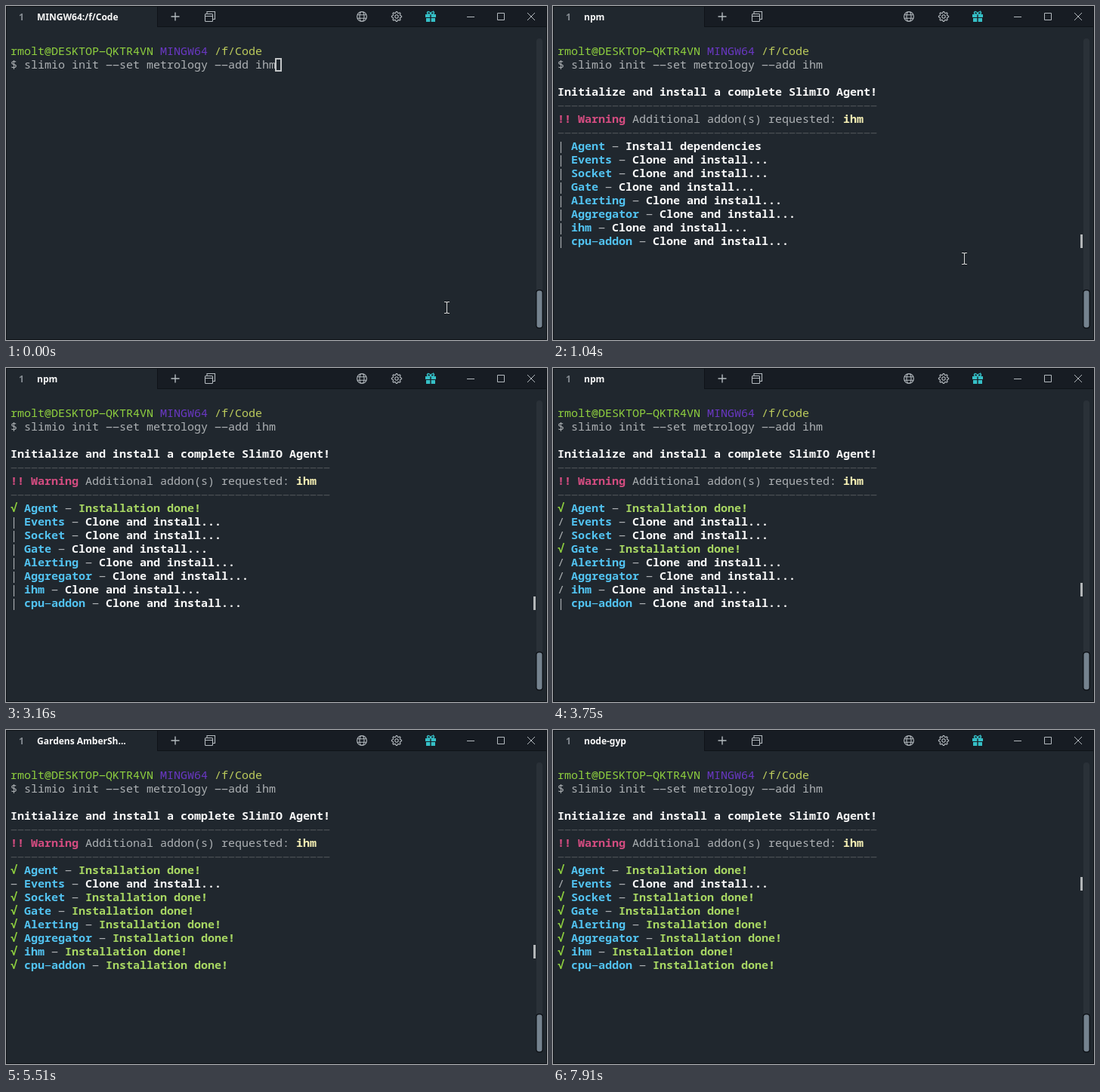
These frames come from a looping animation (716x443 px, 8000 ms). An HTML page with a canvas:

```html
<!DOCTYPE html>
<html lang="en">
<head>
<meta charset="utf-8">
<title>Terminal</title>
<style>
html, body { margin: 0; width: 716px; height: 443px; overflow: hidden; background: #20272e; }
canvas { display: block; }
</style>
</head>
<body>
<canvas id="stage" width="716" height="443"></canvas>
<script>
const ctx = document.getElementById('stage').getContext('2d');
const LOOP = 8000, CELL = 9, LINE = 18, LEFT = 6, TOP = 51;
const TICK = 130, TICK_START = 100, LAG = 25;
const MONO = '"Noto Sans Mono", "DejaVu Sans Mono", monospace';
const SANS = '"Noto Sans", "Open Sans", sans-serif';
const C = {
  bg: '#20272e', bar: '#171c23', edge: '#0f1318', text: '#adb1b4', white: '#fafafa',
  dim: '#4b5054', green: '#8fd03f', lime: '#a8d763', path: '#bccb5c', purple: '#6a38c4',
  pink: '#d34c80', cream: '#f5efb4', blue: '#52c3f1', icon: '#b4babf', teal: '#35bfc6'
};
const NORMAL = 500, BOLD = 600;

// name, time the row appears, time it is done
const TASKS = [
  ['Agent', 580, 2100],
  ['Events', 880, Infinity],
  ['Socket', 880, 3850],
  ['Gate', 880, 3720],
  ['Alerting', 880, 4020],
  ['Aggregator', 880, 4240],
  ['ihm', 880, 5470],
  ['cpu-addon', 880, 4800]
].map(([name, from, done], i) => ({ name, from, done, row: 7 + i }));

const TITLES = [
  [0, 'MINGW64:/f/Code'], [880, 'npm'], [4900, 'node-gyp'],
  [5400, 'Gardens AmberSh...'], [6450, 'node-gyp']
];

function rect(x, y, w, h, color) {
  ctx.fillStyle = color;
  ctx.fillRect(x, y, w, h);
}

function pill(x, y, w, h, r, color) {
  ctx.fillStyle = color;
  ctx.beginPath();
  ctx.roundRect(x, y, w, h, r);
  ctx.fill();
}

function path(color, width, draw) {
  ctx.strokeStyle = color;
  ctx.lineWidth = width;
  ctx.beginPath();
  draw();
  ctx.stroke();
}

function line(...p) {
  ctx.moveTo(p[0], p[1]);
  for (let i = 2; i < p.length; i += 2) ctx.lineTo(p[i], p[i + 1]);
}

// Runs are [text, color, weight]; hyphens are drawn as wide strokes.
function print(row, ...runs) {
  const top = TOP + row * LINE;
  let x = LEFT;
  for (const [text, color, weight = NORMAL] of runs) {
    ctx.font = `${weight} 15px ${MONO}`;
    ctx.fillStyle = color;
    ctx.fillText(text.replace(/-/g, ' '), x, top + 14);
    [...text].forEach((c, i) => {
      if (c === '-') rect(x + i * CELL + 0.7, top + 9, 7.6, 1.2, color);
    });
    x += text.length * CELL;
  }
}

function drawGlobe(x, y) {
  path(C.icon, 1.1, () => {
    ctx.arc(x, y, 6.4, 0, 7);
    ctx.moveTo(x + 3, y);
    ctx.ellipse(x, y, 3, 6.4, 0, 0, 7);
    line(x - 6, y - 2.2, x + 6, y - 2.2);
    line(x - 6, y + 2.2, x + 6, y + 2.2);
  });
}

function drawGear(x, y) {
  path(C.icon, 1.1, () => {
    for (let i = 0; i <= 32; i++) {
      const a = (i - 0.5) * Math.PI / 16;
      const r = i % 4 < 2 ? 6.6 : 5;
      ctx.lineTo(x + r * Math.cos(a), y + r * Math.sin(a));
    }
    ctx.moveTo(x + 2.2, y);
    ctx.arc(x, y, 2.2, 0, 7);
  });
}

function drawGift(x, y) {
  rect(x - 7, y - 3, 6.3, 4, C.teal);
  rect(x + 0.7, y - 3, 6.3, 4, C.teal);
  rect(x - 6, y + 2, 5.3, 5, C.teal);
  rect(x + 0.7, y + 2, 5.3, 5, C.teal);
  path(C.teal, 1.4, () => {
    ctx.ellipse(x - 2.4, y - 4.6, 2.2, 1.6, 0.5, 0, 7);
    ctx.moveTo(x + 4.4, y - 4.6);
    ctx.ellipse(x + 2.4, y - 4.6, 2.2, 1.6, -0.5, 0, 7);
  });
}

function drawWindow(t) {
  rect(0, 0, 716, 443, C.bg);
  rect(201, 0, 515, 27, C.bar);
  rect(200, 0, 1, 28, C.edge);
  rect(201, 27, 515, 1, C.edge);
  path(C.edge, 1, () => ctx.rect(0.5, 0.5, 715, 442));

  ctx.font = `600 12px ${SANS}`;
  ctx.fillStyle = '#858c92';
  ctx.fillText('1', 17, 19);
  ctx.fillStyle = C.white;
  ctx.fillText(TITLES.filter(([from]) => t >= from).pop()[1], 41, 19);

  path(C.icon, 1.4, () => {
    line(218.5, 14, 229.5, 14);
    line(224, 8.5, 224, 19.5);
  });
  path(C.icon, 1.1, () => {
    ctx.roundRect(263.5, 10.5, 10, 10, 1);
    line(266, 10, 266, 7.5, 276.5, 7.5, 276.5, 17.5, 274, 17.5);
    line(263.5, 13.5, 273.5, 13.5);
  });
  drawGlobe(471, 14);
  drawGear(517, 14);
  drawGift(562, 14);
  path(C.icon, 1, () => {
    line(610, 14.5, 620, 14.5);
    ctx.rect(650.5, 9.5, 9, 9);
    line(690, 9, 700, 19);
    line(700, 9, 690, 19);
  });

  pill(702, 43, 8, 384, 4, '#2a3138');
  pill(701, 376, 10, 52, 4.5, '#0f1318');
  pill(702.5, 377.5, 7, 49, 3, '#75838f');
}

function tickStart(t, lag) {
  return Math.floor((t - lag - TICK_START) / TICK) * TICK + TICK_START;
}

function drawTasks(t) {
  const start = tickStart(t, 0);
  const active = TASKS.filter(k => t >= k.from && k.done > start);
  const last = active[active.length - 1];
  for (const k of TASKS) {
    if (t < k.from) continue;
    const done = t >= k.done;
    const step = (tickStart(t, k === last && active.length > 1 ? LAG : 0) - TICK_START) / TICK;
    const mark = '-\\|/'[(step + 3) % 4];
    const label = done ? 'Installation done!'
      : k.name === 'Agent' ? 'Install dependencies' : 'Clone and install...';
    print(k.row,
      done ? ['√', C.green, BOLD] : [mark, C.text],
      [' ' + k.name, C.blue, BOLD], [' - ', C.text],
      [label, done ? C.lime : C.white, BOLD]);
  }
  // The caret rests past the right edge of the row written last.
  const caret = t - start < LAG && active.length > 1 ? active[active.length - 2] : last;
  rect(698, TOP + caret.row * LINE, 3, LINE, '#b4b7b9');
}

function drawCaret(col, row) {
  path('#c3c6c8', 2, () =>
    ctx.rect(LEFT + col * CELL, TOP + row * LINE + 1, 7, 16));
}

function drawOutput(t) {
  print(0, ['rmolt@DESKTOP-QKTR4VN', C.green], [' MINGW64', C.purple], [' /f/Code', C.path]);
  print(1, ['$ slimio init --set metrology --add ihm', C.text]);
  if (t < 30) return drawCaret(39, 1);
  if (t < 430) return drawCaret(0, 2);
  const rule = ['-'.repeat(47), C.dim];
  print(3, ['Initialize and install a complete SlimIO Agent!', C.white, BOLD]);
  print(4, rule);
  print(5, ['!! Warning', C.pink, BOLD], [' Additional addon(s) requested: ', C.text], ['ihm', C.cream, BOLD]);
  print(6, rule);
  if (t < 580) return drawCaret(0, 7);
  drawTasks(t);
}

const span = (t, a, b) => Math.min(1, Math.max(0, (t - a) / (b - a)));

function drawPointer(t) {
  const move = 1 - (1 - span(t, 60, 620)) ** 2;
  const leave = span(t, 2300, 2860) ** 1.6;
  const x = Math.round(583 - 39 * move) + 0.5;
  const y = Math.round(400 - 65 * move + 130 * leave);
  const shape = () => {
    line(x - 3.5, y - 7.5, x - 1, y - 7.5, x, y - 6.5, x + 1, y - 7.5, x + 3.5, y - 7.5);
    line(x, y - 6.5, x, y + 6.5);
    line(x - 3.5, y + 7.5, x - 1, y + 7.5, x, y + 6.5, x + 1, y + 7.5, x + 3.5, y + 7.5);
  };
  path('#15191d', 2.4, shape);
  path('#d8dadb', 1.1, shape);
}

const begin = performance.now();
function frame() {
  const t = (performance.now() - begin) % LOOP;
  drawWindow(t);
  drawOutput(t);
  drawPointer(t);
  requestAnimationFrame(frame);
}
frame();
</script>
</body>
</html>
```
